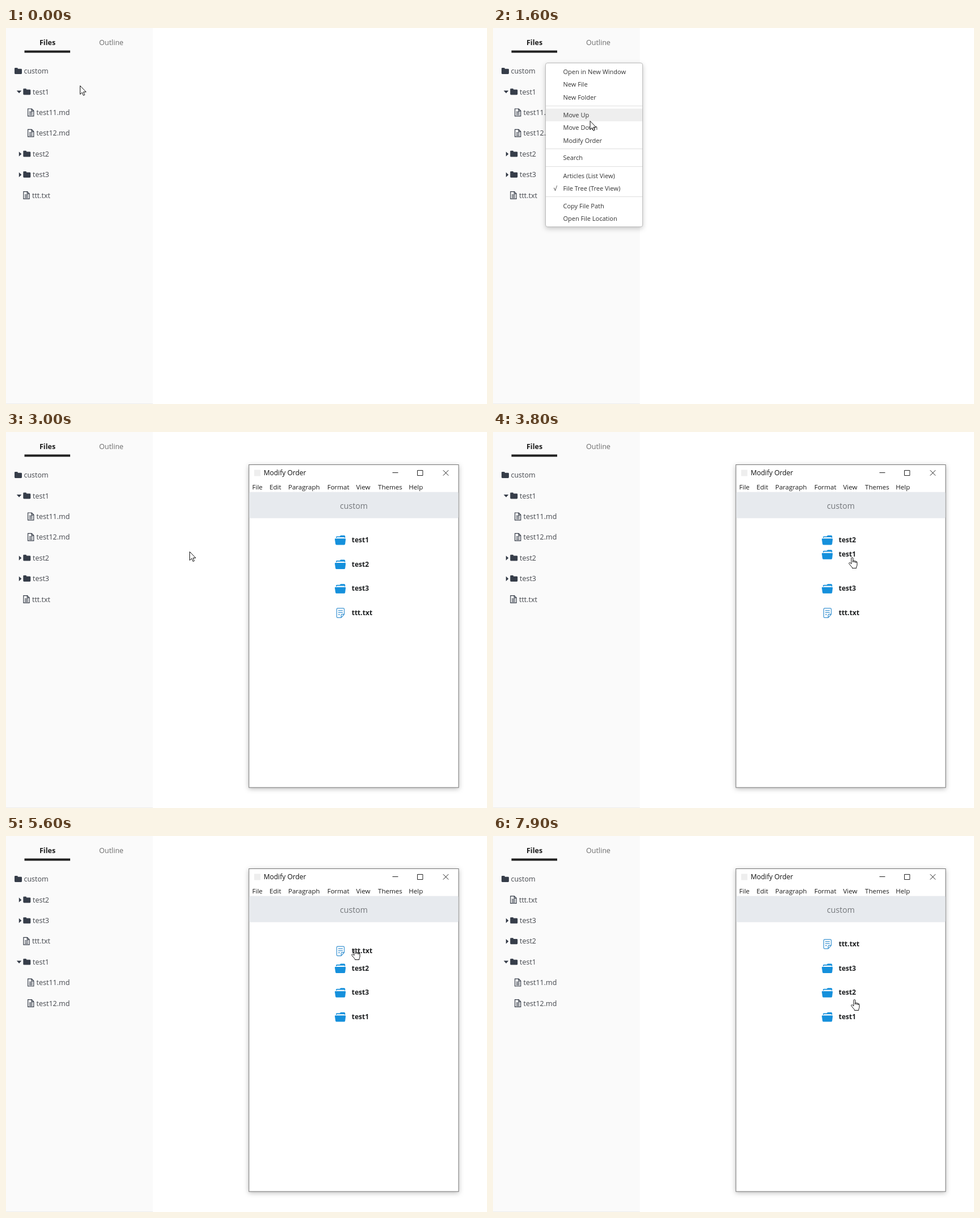
Write an HTML page that moves like this. It is 847 px wide and 661 px high and loops after 8000 ms.

```html
<!DOCTYPE html>
<html lang="en">
<head>
<meta charset="utf-8">
<title>Modify order</title>
<style>
  html, body { margin: 0; width: 100%; height: 100%; overflow: hidden; background: #fff; }
  svg { display: block; width: 100%; height: 100%; }
  text { font-family: "Open Sans", "Noto Sans", sans-serif; white-space: pre; }
  .side text { font-size: 12.5px; fill: #43464c; }
  .side .icon { fill: #363d49; }
  .side .page { fill: none; stroke: #363d49; stroke-width: 1.2; }
  .side .tab { fill: #1c1c1c; font-weight: 700; }
  .side .off { fill: #6c6c6c; }
  .menu { filter: drop-shadow(0 3px 4px rgba(0,0,0,.2)); }
  .menu text { font-size: 11px; fill: #333; }
  .frame { filter: drop-shadow(0 2px 4px rgba(0,0,0,.26)); }
  .win text { font-size: 11.55px; fill: #1a1a1a; }
  .win .title { font-size: 12px; fill: #111; }
  .win .head { font-size: 14.2px; fill: #74777b; text-anchor: middle; }
  .win .name { font-size: 12px; font-weight: 700; fill: #1d1f21; }
  .win .btn { fill: none; stroke: #222; stroke-width: 1; }
  .blue { fill: #1590dc; }
  .note { fill: #fff; stroke: #3c94d2; stroke-width: 1.2; }
  .ptr { fill: #fff; stroke: #111; stroke-width: 1; stroke-linejoin: round; }
</style>
</head>
<body>
<svg id="stage" viewBox="0 0 847 661" preserveAspectRatio="none"></svg>
<script>
const LOOP = 8000, STEP = 100;
const stage = document.getElementById('stage');

function add(parent, tag, attrs = {}, content) {
  const node = document.createElementNS('http://www.w3.org/2000/svg', tag);
  for (const key in attrs) node.setAttribute(key, attrs[key]);
  if (content !== undefined) node.textContent = content;
  return parent.appendChild(node);
}
const group = (parent, cls = '') => add(parent, 'g', { class: cls });
const rect = (parent, x, y, width, height, fill, more) =>
  add(parent, 'rect', { x, y, width, height, fill, ...more });
const path = (parent, d, cls) => add(parent, 'path', { d, class: cls });
const label = (parent, x, y, str, cls = '') => add(parent, 'text', { x, y, class: cls }, str);
const place = (node, x, y) => node.setAttribute('transform', `translate(${x} ${y})`);
const show = (node, on) => node.setAttribute('display', on ? 'inline' : 'none');

// Sidebar
const side = group(stage, 'side');
rect(side, 0, 0, 258.5, 661, '#fafafa');
rect(side, 0, 660, 258.5, 1, '#eeeeee');
label(side, 59, 30, 'Files', 'tab');
label(side, 164, 30, 'Outline', 'off');
rect(side, 32.5, 39.5, 80.5, 4, '#222');

const TREE_TOP = 75.6, TREE_GAP = 36.4;

function treeFolder(parent, x) {
  path(parent, `M${x} -4.3q0 -1.2 1.2 -1.2h3.4q1.2 0 1.2 1.2v.5h5.8q1.4 0 1.4 1.4v6.4q0 1.4 -1.4 1.4h-10.2q-1.4 0 -1.4 -1.4z`, 'icon');
}
function treePage(parent, x) {
  path(parent, `M${x + .6} -6.4h6.6l3.6 3.6v9.2h-10.2zM${x + 7} -6.4v3.8h3.8M${x + 2.8} -.7h5.8M${x + 2.8} 1.7h5.8M${x + 2.8} 4.1h5.8`, 'page');
}
function treeRow(name, kind) {
  const g = group(side);
  if (kind === 'root') { treeFolder(g, 15); label(g, 31.5, 4.5, name); }
  if (kind === 'open' || kind === 'closed') {
    path(g, kind === 'open' ? 'M18.8 -2h8.6l-4.3 4.7z' : 'M22.8 -3.8v8.4l4.6 -4.2z', 'icon');
    treeFolder(g, 30.3);
    label(g, 47, 4.5, name);
  }
  if (kind === 'child') { treePage(g, 38); label(g, 53.6, 4.5, name); }
  if (kind === 'file') { treePage(g, 30.3); label(g, 46, 4.5, name); }
  return g;
}
place(treeRow('custom', 'root'), 0, TREE_TOP);
const tree = {
  test1: [treeRow('test1', 'open'), treeRow('test11.md', 'child'), treeRow('test12.md', 'child')],
  test2: [treeRow('test2', 'closed')],
  test3: [treeRow('test3', 'closed')],
  ttt: [treeRow('ttt.txt', 'file')]
};

// Context menu
const menu = group(stage, 'menu');
rect(menu, 92.5, 61.5, 171, 288, '#fff', { rx: 3.5, stroke: '#b9b9b9' });
const hover = rect(menu, 93, 0, 170, 22.3, '#eeeeee');
const ITEM_H = 22.3;
const sections = [
  [77, 'Open in New Window', 'New File', 'New Folder'],
  [153, 'Move Up', 'Move Down', 'Modify Order'],
  [228.4, 'Search'],
  [259.6, 'Articles (List View)', 'File Tree (Tree View)'],
  [312.6, 'Copy File Path', 'Open File Location']
];
const itemTops = [];
sections.forEach(([top, ...items], n) => {
  if (n) rect(menu, 93, top - 16.5, 170, 1, '#dedede');
  items.forEach((str, i) => {
    const y = top + i * ITEM_H;
    itemTops.push(y - 11.3);
    label(menu, 123.5, y + 4, str);
  });
});
label(menu, 106.5, 286, '√');

// Order window
const win = group(stage, 'win');
rect(win, 427.8, 57.5, 369.2, 567.5, '#fff', { class: 'frame', stroke: '#777' });
rect(win, 437, 66.5, 11, 11, '#eeeeee');
path(win, 'M680.5 71.5h10M724.5 67.5h9.4v9h-9.4zM769.8 67.2l9.4 9.4M779.2 67.2l-9.4 9.4', 'btn');
const title = label(win, 453.7, 76.2, '', 'title');
const body = group(win);
[['File', 433.5], ['Edit', 464], ['Paragraph', 497], ['Format', 565.7],
 ['View', 616.5], ['Themes', 655], ['Help', 709.3]]
  .forEach(([str, x]) => label(body, x, 101, str));
rect(body, 428.3, 105.5, 368.2, 46, '#e7eaee', { rx: 2 });
label(body, 612.5, 134.6, 'custom', 'head');

const ROW_TOP = 189.5, ROW_GAP = 42.7;
function listRow(name, isNote) {
  const g = group(body);
  if (isNote) {
    path(g, 'M584 -7.7h10q1.6 0 1.6 1.6v8.9l-5.4 5.9h-6.2q-1.6 0 -1.6 -1.6v-13.2q0 -1.6 1.6 -1.6zM590.2 8.5v-4.1q0 -1.6 1.6 -1.6h3.6M585 -3.8h8M585 -.3h8M585 3.2h3', 'note');
  } else {
    path(g, 'M581 -3.4v-1.2q0 -1.5 1.5 -1.5h5.2l1.6 -1.6h6.2q1.8 0 1.8 1.8v2.5h-1.5v-1h-13.3v1z', 'blue');
    path(g, 'M580.2 -2.2h16.8q1.4 0 1.2 1.4l-1 8.1q-.2 1.6 -1.8 1.6h-13.4q-1.6 0 -1.8 -1.6l-1.2 -8.1q-.2 -1.4 1.2 -1.4z', 'blue');
  }
  label(g, 608.7, 4.3, name, 'name');
  return g;
}
const rows = {
  test1: listRow('test1'), test2: listRow('test2'),
  test3: listRow('test3'), ttt: listRow('ttt.txt', true)
};

// Pointers
const arrow = path(stage, 'M.5 .5V15.6L4 12.3L6.3 17.6L8.6 16.6L6.3 11.4H11Z', 'ptr');
const hand = path(stage, 'M5 12V2.2a1.5 1.5 0 0 1 3 0V9V7.4a1.2 1.2 0 0 1 2.5 0V9.4V8a1.2 1.2 0 0 1 2.4 0V10V9a1.1 1.1 0 0 1 2.2 0V14.5c0 1 -1.2 2.4 -1.2 3.4V19.5H6.5V18.3C5 16.5 3 14.3 1 11.6C.2 10 2.3 9 3.4 10.3Z', 'ptr');
const busy = group(stage);
add(busy, 'circle', { r: 5.4, fill: '#fff', stroke: '#2b8fe0', 'stroke-width': 3.4 });
const glint = add(busy, 'path', { d: 'M0 -5.4A5.4 5.4 0 0 1 5.4 0', fill: 'none', stroke: '#62b3f2', 'stroke-width': 2.4 });

// time, x, y
const moves = [
  [0, 130, 101], [500, 92, 62], [600, 92, 62], [900, 100, 71], [1300, 141, 125],
  [1600, 170.5, 163], [1900, 177, 192], [2700, 177, 192], [3000, 323, 210],
  [3400, 560, 206], [3600, 626, 194.5], [3700, 626, 194.5], [4100, 626, 296],
  [4700, 626, 296], [4900, 624, 305], [5300, 610, 288], [5400, 608, 271],
  [5600, 608, 198], [5800, 608, 190], [6200, 614, 222], [6300, 614, 222],
  [6400, 615, 225], [6500, 615, 225], [7000, 620, 255], [7200, 622, 262],
  [7400, 624, 264], [7900, 630, 287], [8000, 630, 287]
];
// time, scale, opacity
const opening = [[2400, .9, 0], [2500, .94, .25], [2600, .98, .62], [2700, 1, 1], [8000, 1, 1]];
// start, end, row
const drags = [[3700, 4900, 'test1'], [5400, 5800, 'ttt'], [6500, 7200, 'test2']];

function sample(table, t) {
  if (t <= table[0][0]) return table[0].slice(1);
  const i = table.findIndex(k => k[0] >= t);
  const a = table[i - 1], b = table[i], p = (t - a[0]) / (b[0] - a[0]);
  return a.slice(1).map((v, n) => v + (b[n + 1] - v) * p);
}

// Replays the drags up to t
function listAt(t) {
  const order = ['test1', 'test2', 'test3', 'ttt'];
  let dropped = [...order], held = null, heldY = 0;
  for (const [start, end, name] of drags) {
    if (t < start) break;
    const from = order.indexOf(name);
    const shift = sample(moves, Math.min(t, end))[1] - sample(moves, start)[1];
    const slot = Math.max(0, Math.min(3, Math.round(from + shift / ROW_GAP)));
    order.splice(from, 1);
    order.splice(slot, 0, name);
    if (t < end) { held = name; heldY = ROW_TOP + from * ROW_GAP + shift; }
    else dropped = [...order];
  }
  return { order, dropped, held, heldY };
}

function render(t) {
  const [x, y] = sample(moves, t);
  const list = listAt(t);

  let line = 1;
  for (const name of list.dropped)
    for (const row of tree[name]) place(row, 0, TREE_TOP + TREE_GAP * line++);
  list.order.forEach((name, i) =>
    place(rows[name], 0, name === list.held ? list.heldY : ROW_TOP + i * ROW_GAP));

  show(menu, t >= 600 && t < 2000);
  const top = itemTops.find(v => y >= v && y < v + ITEM_H);
  show(hover, top !== undefined);
  if (top !== undefined) hover.setAttribute('y', top);

  const [scale, alpha] = sample(opening, t);
  show(win, alpha > 0);
  win.setAttribute('opacity', alpha);
  win.setAttribute('transform', `translate(612.3 341.3) scale(${scale}) translate(-612.3 -341.3)`);
  const ready = t >= 2900;
  title.textContent = ready ? 'Modify Order' : 'Qurvel';
  show(body, ready);

  const pointing = x > 575;
  show(arrow, !pointing);
  show(hand, pointing);
  place(arrow, x, y);
  place(hand, x, y);
  show(busy, t >= 2100 && t < 2900);
  place(busy, x + 13.8, y);
  glint.setAttribute('transform', `rotate(${t * .36})`);
}

const begin = performance.now();
function tick() {
  const t = (performance.now() - begin) % LOOP;
  render(Math.floor(t / STEP) * STEP);
  requestAnimationFrame(tick);
}
render(0);
requestAnimationFrame(tick);
</script>
</body>
</html>
```
